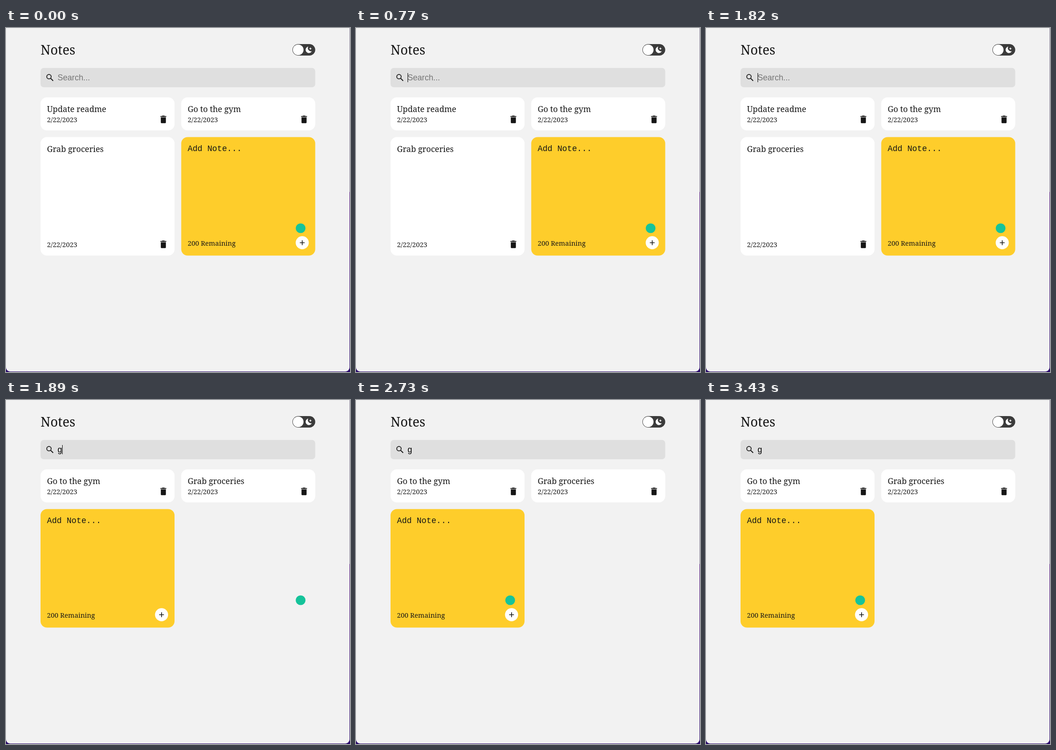
An HTML page that plays this animation: 747 by 749 pixels, repeating every 3570 ms.

```html
<!DOCTYPE html>
<html lang="en">
<head>
<meta charset="utf-8">
<title>Notes</title>
<style>
  html, body { margin: 0; width: 100%; height: 100%; overflow: hidden; }
  svg { display: block; width: 747px; height: 749px; }
  text { font: 17.6px "Noto Serif", serif; fill: #161616; white-space: pre; }
  .heading { font-size: 28.2px; }
  .small { font-size: 14.67px; }
  .field { font-family: "Liberation Sans", Arial, sans-serif; }
  .mono { font: 17.8px "Liberation Mono", "Courier New", monospace; }
</style>
</head>
<body>
<svg viewBox="0 0 747 749">
  <defs>
    <linearGradient id="desk" x2="0" y2="1">
      <stop offset="0" stop-color="#8a8398"/>
      <stop offset=".477" stop-color="#8a8398"/>
      <stop offset=".477" stop-color="#4b0a78"/>
      <stop offset="1" stop-color="#2a0a6c"/>
    </linearGradient>
    <path id="bin" fill="#161616" transform="scale(.92) translate(-12 -12)"
      d="M6 19c0 1.1.9 2 2 2h8c1.1 0 2-.9 2-2V7H6zM19 4h-3.5l-1-1h-5l-1 1H5v2h14z"/>
  </defs>

  <rect width="747" height="749" fill="url(#desk)"/>
  <path d="M0 0H746V739a9 9 0 0 1-9 9H9a9 9 0 0 1-9-9z" fill="#f2f2f2"/>

  <text class="heading" x="75" y="58">Notes</text>

  <rect x="622" y="35" width="49.5" height="25" rx="12.5" fill="#3b3b3b"/>
  <circle cx="634.5" cy="47.5" r="11.6" fill="#fff"/>
  <path d="M656.3 40.6A7 7 0 1 0 664 50.4A6.8 6.8 0 0 1 656.3 40.6z
    M661 41.8l.9 2.2 2.2.9-2.2.9-.9 2.2-.9-2.2-2.2-.9 2.2-.9z" fill="#fff"/>

  <rect x="75" y="87" width="596.5" height="42" rx="7" fill="#dfdfdf"/>
  <g fill="none" stroke="#161616" stroke-width="1.75">
    <circle cx="93.3" cy="105.9" r="4.8"/>
    <path d="M97 109.6l5.4 5.4" stroke-width="2"/>
  </g>
  <text id="query" class="field" x="112" y="114.3"></text>
  <rect id="caret" y="98" width="1" height="20" fill="#000"/>

  <g id="all"></g>
  <g id="found"></g>
  <circle id="badge" cy="436" r="10.6" fill="#15c39a"/>
</svg>
<script>
const LOOP = 3570, TYPED = 1890, BADGE_MOVES = 2730;
const CARET_ON = [[770, 1260], [1820, 2380], [2940, 3430]];
const COLUMNS = [75, 380.5];
const $ = id => document.getElementById(id);

const card = (col, tall, fill, content) => `
  <g transform="translate(${COLUMNS[col]} ${tall ? 237.5 : 151})">
    <rect width="291" height="${tall ? 258 : 72}" rx="14" fill="${fill}"/>${content}
  </g>`;

function note(title, col, tall = false) {
  const bottom = tall ? 239.5 : 54;
  return card(col, tall, '#fff', `
    <text x="14" y="32.3">${title}</text>
    <text class="small" x="14" y="${bottom}">2/22/2023</text>
    <use href="#bin" x="266.7" y="${bottom - 6}"/>`);
}

const addNote = col => card(col, true, '#fecd2b', `
  <text class="mono" x="14" y="30">Add Note...</text>
  <text class="small" x="14" y="236.3">200 Remaining</text>
  <circle cx="262.8" cy="230" r="14.2" fill="#fff"/>
  <path d="M257.6 230h10.4M262.8 224.8v10.4" stroke="#161616" stroke-width="1.6"/>`);

$('all').innerHTML = note('Update readme', 0) + note('Go to the gym', 1)
  + note('Grab groceries', 0, true) + addNote(1);
$('found').innerHTML = note('Go to the gym', 0) + note('Grab groceries', 1) + addNote(0);

function draw(now) {
  const t = now % LOOP, typed = t >= TYPED;
  const show = (id, on) => $(id).setAttribute('visibility', on ? 'visible' : 'hidden');
  show('all', !typed);
  show('found', typed);
  show('caret', CARET_ON.some(([from, to]) => t >= from && t < to));
  $('caret').setAttribute('x', typed ? 122 : 112);
  $('query').textContent = typed ? 'g' : 'Search...';
  $('query').style.fill = typed ? '#000' : '#757575';
  $('badge').setAttribute('cx', t < BADGE_MOVES ? 639.8 : 334.8);
}

const start = performance.now();
function tick() {
  draw(performance.now() - start);
  requestAnimationFrame(tick);
}
tick();
</script>
</body>
</html>
```
